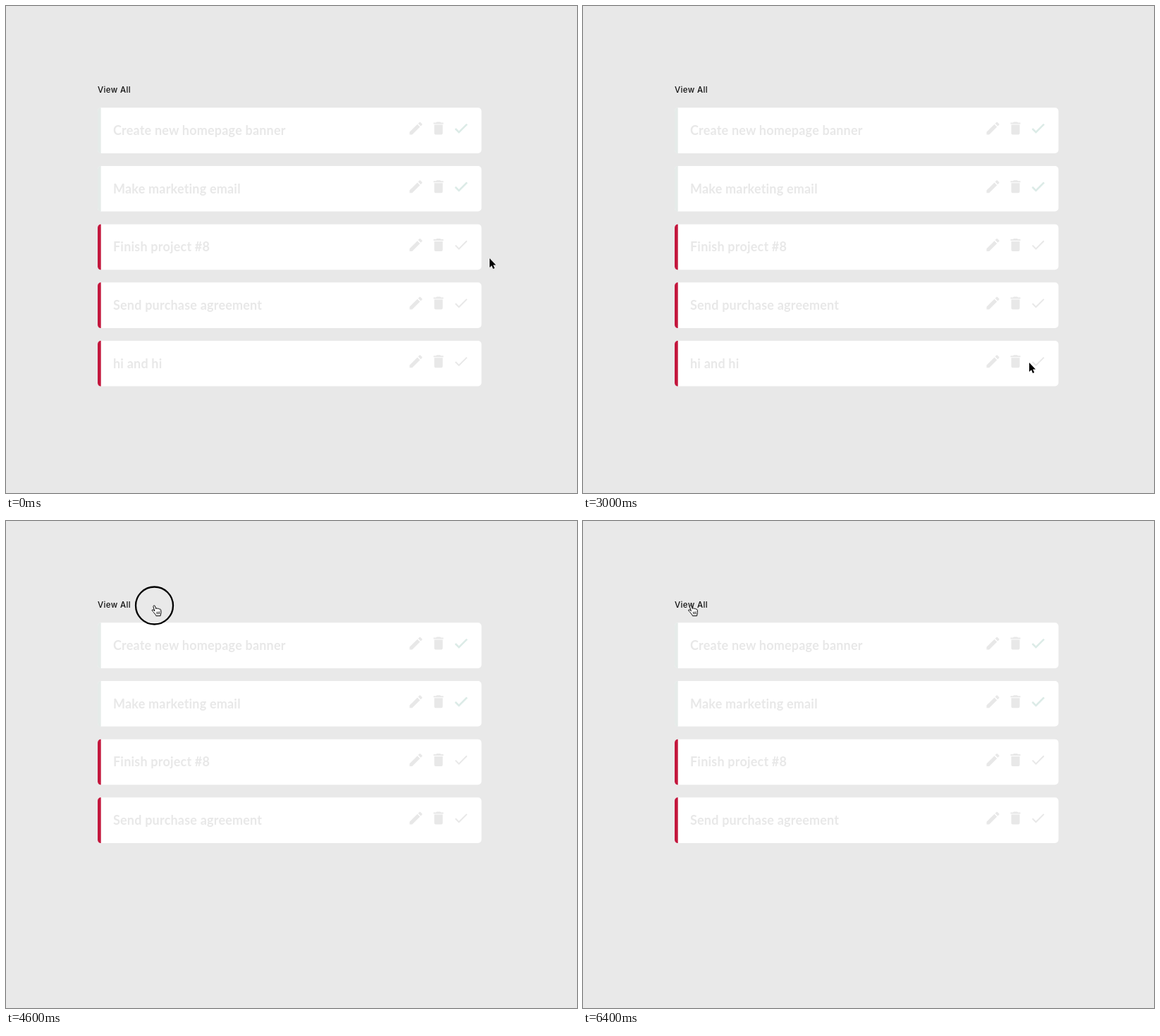
Animation, 810 px wide and 691 px high, one loop 6600 ms. Source, as an HTML page:

```html
<!DOCTYPE html>
<html lang="en">
<head>
<meta charset="utf-8">
<title>Task list</title>
<style>
  html, body { margin: 0; width: 100%; height: 100%; overflow: hidden; background: #e8e8e8; }
  svg { display: block; width: 100vw; height: 100vh; }
  .tab { font: 500 11.5px Inter, sans-serif; letter-spacing: .35px; fill: #111; }
  .title { font: 700 18px Lato, sans-serif; letter-spacing: .2px; fill: #e8e8e8; }
  .icon { fill: #e8e8e8; }
  .bar { fill: #c3173d; }
  .done .bar { fill: #e5ebe9; }
  .done .check { fill: #dcebe7; stroke: #dcebe7; stroke-width: .8; }
</style>
</head>
<body>
<svg id="stage" viewBox="0 0 810 691">
  <rect id="back" width="810" height="691"/>
  <g id="tabs"></g>
  <g id="rows"></g>
  <circle id="ring" r="26.5" fill="none" stroke="#000" stroke-width="2.3"/>
  <g id="arrow">
    <path d="M0 0V13L3 10.2 5 15 7.2 14 5.1 9.4H9Z" stroke="#fff" stroke-width="1" paint-order="stroke"/>
  </g>
  <g id="hand" stroke="#000" stroke-linejoin="round" stroke-linecap="round">
    <path fill="#fff" d="M-1.6 1.4C-1.9-.2.3-.8.9.8L2.3 4.6C2.6 3.4 4.4 3.3 4.8 4.7 5.2 3.8 6.8 4 7.1 5.3 7.6 4.7 9 5 9.2 6.3L9.5 9.6C9.5 11.6 8.7 12.2 8.6 14.6H2.4C2 12.8.2 11.4-1 9.6-1.9 8.2-3.9 7.4-3.3 6.3-2.4 5.3-1 6.4.1 7.5Z"/>
    <path fill="none" stroke-width=".8" d="M3.4 9.2L3.6 12M5.3 9L5.5 12M7.2 8.8L7.3 11.8"/>
  </g>
</svg>
<script>
const LOOP = 6600, STEP = 100, ROW_TOP = 144.3, ROW_GAP = 82.67;
const TITLES = ['Create new homepage banner', 'Make marketing email', 'Finish project #8',
  'Send purchase agreement', 'hi and hi'];
const TABS = [['View All', 130, 175], ['Completed', 190, 252], ['Ongoing', 267, 317]];
const ICONS = [
  [569.5, 'M3 17.25V21h3.75L17.81 9.94l-3.75-3.75L3 17.25zM20.71 7.04a1 1 0 0 0 0-1.41l-2.34-2.34a1 1 0 0 0-1.41 0l-1.83 1.83 3.75 3.75 1.83-1.83z'],
  [601.5, 'M6 19a2 2 0 0 0 2 2h8a2 2 0 0 0 2-2V7H6v12zM19 4h-3.5l-1-1h-5l-1 1H5v2h14V4z'],
  [633.5, 'M9 16.2L4.8 12l-1.4 1.4L9 19 21 7l-1.4-1.4L9 16.2z']
];
// Pointer path: time, x, y
const PATH = [
  [0, 686, 358], [600, 645.5, 341], [2100, 645.5, 341], [2600, 611, 343], [2700, 611, 343],
  [3000, 633, 506], [3400, 618, 498], [3700, 618, 498], [3800, 560, 390], [3900, 450, 235],
  [4000, 345, 130], [4100, 275, 84], [4200, 235, 75], [4500, 210.5, 120], [4800, 210.5, 120],
  [5300, 299.5, 120], [5600, 299.5, 120], [5900, 171.5, 120], [6100, 153, 120], [LOOP, 153, 120]
];
// Each click shows a ring for two steps and acts on the second
const CLICKS = [
  [700, s => s.done[2] = true],
  [1600, s => s.done[2] = false],
  [3500, s => s.count = 4],
  [4600, s => s.tab = 1],
  [5500, s => s.tab = 2],
  [6200, s => s.tab = 0]
];

const $ = id => document.getElementById(id);
function add(parent, tag, attrs, text = '') {
  const el = document.createElementNS('http://www.w3.org/2000/svg', tag);
  for (const key in attrs) el.setAttribute(key, attrs[key]);
  el.textContent = text;
  return parent.appendChild(el);
}
const show = (el, on) => el.setAttribute('visibility', on ? 'visible' : 'hidden');
const place = (el, x, y) => el.setAttribute('transform', `translate(${x} ${y})`);

const tabs = TABS.map(([name, x]) => add($('tabs'), 'text', { class: 'tab', x, y: 123.3 }, name));
const rows = TITLES.map(title => {
  const g = add($('rows'), 'g', {});
  g.card = add(g, 'rect', { x: 130, width: 544.5, height: 64.6, rx: 5 });
  g.bar = add(g, 'path', { class: 'bar', d: 'M134.7 0V64.6C132 64.6 130 62.6 130 59.6V5C130 2 132 0 134.7 0Z' });
  g.body = add(g, 'g', {});
  add(g.body, 'text', { class: 'title', x: 152, y: 38.7 }, title);
  ICONS.forEach(([x, d], i) => add(g.body, 'path',
    { class: i === 2 ? 'icon check' : 'icon', d, transform: `translate(${x} 17.3)` }));
  return g;
});

function pointer(t) {
  const i = PATH.findIndex(p => p[0] > t);
  const [t0, x0, y0] = PATH[i - 1], [t1, x1, y1] = PATH[i];
  const k = (t - t0) / (t1 - t0);
  return [x0 + (x1 - x0) * k, y0 + (y1 - y0) * k];
}

function clickable(x, y, state) {
  if (y > 108 && y < 131) return TABS.some(([, a, b]) => x >= a && x <= b);
  if (state.tab) return false;
  const n = Math.floor((y - ROW_TOP) / ROW_GAP);
  const dy = y - ROW_TOP - n * ROW_GAP;
  return n >= 0 && n < state.count && dy > 17 && dy < 41 &&
    ICONS.some(([left]) => x > left && x < left + 24);
}

function draw(t) {
  const state = { done: [true, true, false, false, false], count: 5, tab: 0 };
  let ring = false;
  for (const [at, act] of CLICKS) {
    if (t >= at + STEP) act(state);
    if (t >= at && t < at + 2 * STEP) ring = true;
  }
  const pale = state.tab > 0;
  const back = pale ? '#f5f5f5' : state.count < 5 ? '#e9e9e9' : '#e8e8e8';
  $('back').setAttribute('fill', back);
  document.body.style.background = back;
  tabs.forEach((el, i) => show(el, i === state.tab));

  let slot = 0;
  rows.forEach((g, i) => {
    const done = state.done[i];
    const on = i < state.count && (!pale || done === (state.tab === 1));
    show(g, on);
    if (!on) return [g.card, g.bar, g.body].forEach(el => show(el, false));
    g.setAttribute('class', done ? 'done' : '');
    g.card.setAttribute('fill', pale ? back : '#fff');
    show(g.card, true);
    show(g.bar, !pale || !done);
    show(g.body, !pale);
    place(g, 0, ROW_TOP + slot++ * ROW_GAP);
  });

  const [x, y] = pointer(t);
  const hand = clickable(x, y, state);
  place($('ring'), x, y);
  show($('ring'), ring);
  place($('hand'), x, y);
  show($('hand'), hand);
  place($('arrow'), x, y);
  show($('arrow'), !hand);
}

const start = performance.now();
function tick() {
  const t = (performance.now() - start) % LOOP;
  draw(Math.floor(t / STEP) * STEP);
  requestAnimationFrame(tick);
}
tick();
</script>
</body>
</html>
```
